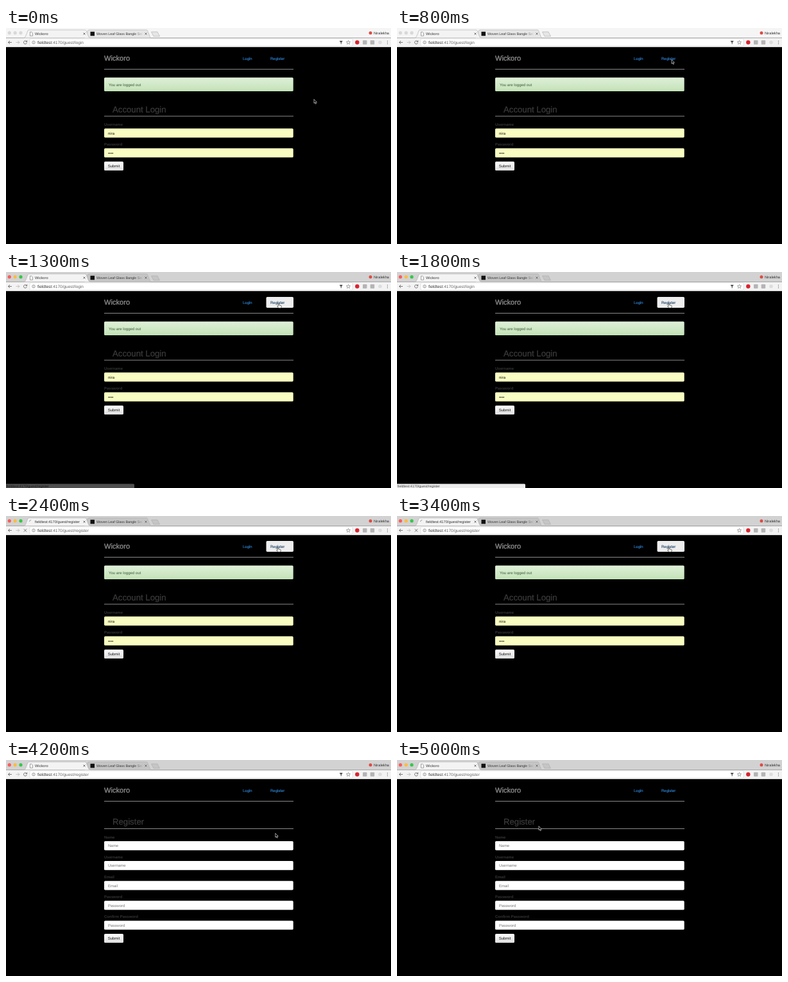
An HTML page for the animation above (5.1 s loop, 600 by 338 pixels).

```html
<!DOCTYPE html>
<html lang="en">
<head>
<meta charset="utf-8">
<title>Register walkthrough</title>
<style>
  html, body { margin: 0; height: 100%; overflow: hidden; background: #000; }
  svg { display: block; width: 100vw; height: 100vh; font: 6px "Liberation Sans", Arial, sans-serif; text-rendering: geometricPrecision; }
  .line { stroke: #8c8c8c; stroke-width: 1; }
  .brand { font-size: 11.1px; fill: #858585; stroke: #858585; stroke-width: .4; }
  .title { font-size: 13.2px; fill: #393939; stroke: #393939; stroke-width: .3; }
  .label { font-weight: bold; fill: #343434; }
  .link { fill: #2f86d8; stroke: #2f86d8; stroke-width: .12; }
  .small { font-size: 5.7px; fill: #333; }
  .icon { fill: none; stroke: #666; stroke-width: .9; }
</style>
</head>
<body>
<svg viewBox="0 0 600 338">
  <defs>
    <linearGradient id="green" x2="0" y2="1"><stop stop-color="#dff0d8"/><stop offset="1" stop-color="#c3e2b7"/></linearGradient>
    <linearGradient id="button" x2="0" y2="1"><stop stop-color="#fff"/><stop offset="1" stop-color="#dedede"/></linearGradient>
    <linearGradient id="fade" gradientUnits="userSpaceOnUse" x1="200" x2="214"><stop stop-color="#333"/><stop offset="1" stop-color="#333" stop-opacity="0"/></linearGradient>
  </defs>
  <rect width="600" height="338"/>

  <!-- browser frame -->
  <rect id="strip" width="600" height="15.5"/>
  <g id="lights"><circle cx="5.3" cy="7.7" r="2.6"/><circle cx="14.2" cy="7.7" r="2.6"/><circle cx="23" cy="7.7" r="2.6"/></g>
  <g stroke="#aaa" stroke-width=".6">
    <path id="backTab" d="M123 15.5L127.500 4Q128 3 129 3H219Q220 3 220.500 4L225 15.500"/>
    <path id="plusTab" d="M226.500 6H236L239.500 13H230Z"/>
    <path d="M0 15.500H28Q30 15 31 12L34 4Q34.500 3 36 3H123Q124.500 3 125 4L128 12Q129 15 131 15.500H600" fill="#f3f3f3"/>
  </g>
  <rect y="15.8" width="600" height="14.2" fill="#f3f3f3"/>
  <rect y="29.5" width="600" height=".5" fill="#b0b0b0"/>
  <rect x="37" y="17" width="503" height="11.300" rx="1.200" fill="#fff" stroke="#ccc" stroke-width=".5"/>
  <rect x="131.500" y="5.800" width="6.500" height="6.500" fill="#111"/>
  <text x="141" y="11" font-size="5.4" fill="url(#fade)">Woven Leaf Glass Bangle Set</text>
  <path class="icon" d="M120.500 7.500l3 3m0-3l-3 3M216.500 7.500l3 3m0-3l-3 3"/>
  <path class="icon" d="M9 22.500H3.500m2.500-2.500l-2.500 2.500 2.500 2.500"/>
  <path class="icon" d="M15.500 22.500H21m-2.500-2.500l2.500 2.500-2.500 2.500" style="stroke:#bbb"/>
  <g class="icon"><circle cx="43" cy="22.500" r="2.300" stroke-width=".6"/><path d="M43 22v1.700M43 20.900v.6" stroke-width=".6"/></g>
  <path class="icon" style="stroke-width:.6" d="M533.500 19.500l.9 2 2.200.2-1.700 1.500.5 2.200-1.900-1.200-1.900 1.200.5-2.200-1.700-1.500 2.200-.2z"/>
  <circle cx="547.300" cy="22.500" r="3.200" fill="#d8232f"/>
  <g fill="#b4b4b4"><rect x="556" y="19.300" width="6.500" height="6.500" rx="1"/><rect x="567.700" y="19.300" width="6.500" height="6.500" rx="1"/></g>
  <circle cx="583" cy="22.500" r="2.800" fill="#ddd"/>
  <g fill="#666"><circle cx="594.500" cy="20.300" r=".6"/><circle cx="594.500" cy="22.500" r=".6"/><circle cx="594.500" cy="24.700" r=".6"/></g>
  <circle cx="568" cy="7.700" r="2.500" fill="#df4b45"/>
  <text class="small" x="573" y="9.700">Niralekha</text>
  <text class="small" id="tabTitle" x="45" y="11"></text>
  <text x="49" y="24.700" font-size="6.5" fill="#333">fieldtest<tspan id="path" fill="#666"></tspan></text>
  <g id="idle">
    <path class="icon" d="M37.500 6.300h2.500l1.500 1.500v4.500h-4z" style="stroke-width:.6;fill:#fff"/>
    <path class="icon" d="M32.200 21.300A2.500 2.500 0 1 0 32.400 23.300M32.700 19.500v2.200h-2.200"/>
    <path d="M519.800 20h4.800l-1.200 2.500h-2.400zM521.700 22h1.100v3.300h-1.100z" fill="#555"/>
  </g>
  <g id="busy">
    <path id="spinner" class="icon" d="M36.500 9A2.700 2.700 0 0 1 39.200 6.300" style="stroke:#999"/>
    <path class="icon" d="M27.800 20.300l4.400 4.400m0-4.400l-4.400 4.400"/>
  </g>

  <!-- page header -->
  <text class="brand" x="153" y="51.300">Wickoro</text>
  <text class="link" x="369" y="49.600">Login</text>
  <rect id="hover" x="405.500" y="39" width="42.500" height="17" rx="1.800" fill="#eee"/>
  <text id="register" class="link" x="412" y="49.600">Register</text>
  <path class="line" d="M153 64.500H448"/>

  <g id="loginPage">
    <rect x="153" y="77.500" width="294.700" height="21.500" rx="1.600" fill="url(#green)"/>
    <text x="160" y="90.500" fill="#3b5a3c">You are logged out</text>
  </g>
  <g id="registerPage"></g>

  <g id="status">
    <path d="M0 331.500H198.500Q200 331.500 200 333V338H0Z" fill="#ececec"/>
    <text x=".7" y="337" font-size="5.4" fill="#444">fieldtest:4170/guest/register</text>
  </g>

  <g id="cursor" stroke-width=".6" stroke-linejoin="round">
    <path id="arrow" stroke="#fff" d="M0 0V6.200L1.400 5 2.400 7.300 3.500 6.800 2.500 4.600H4.400Z"/>
    <path id="hand" fill="#fff" stroke="#111" d="M-.8 .6Q0-.3 .7 .6V3L3.600 3.600Q4.400 4 4.200 5L3.600 7.500H-.2L-2.300 4.800Q-2.200 3.800-.8 4.600Z"/>
  </g>
</svg>
<script>
const $ = id => document.getElementById(id);
const show = (id, on) => $(id).style.display = on ? "" : "none";

const heading = (name, line) =>
  `<text class="title" x="166" y="${line - 6.2}">${name}</text><path class="line" d="M153 ${line}H448"/>`;
const field = (label, y, text, fill, ink) =>
  `<text class="label" x="153" y="${y - 4.2}">${label}</text>
   <rect x="153" y="${y}" width="294.700" height="14.200" rx="1.600" fill="${fill}"/>
   <text x="159" y="${y + 9.3}" fill="${ink}">${text}</text>`;
const submit = y =>
  `<rect x="153" y="${y}" width="30" height="14" rx="1.600" fill="url(#button)"/>
   <text x="168" y="${y + 9.1}" text-anchor="middle" fill="#111">Submit</text>`;

$("loginPage").innerHTML += heading("Account Login", 138)
  + field("Username", 157.2, "nira", "#fafdc2", "#111")
  + field("Password", 188.3, "••••", "#fafdc2", "#111")
  + submit(209);
$("registerPage").innerHTML = heading("Register", 107.5)
  + ["Name", "Username", "Email", "Password", "Confirm Password"].map((label, i) =>
      field(label, 127 + 31.1 * i, label.replace("Confirm ", ""), "#fff", "#747474")).join("")
  + submit(272);

// cursor tip: time, x, y
const route = [
  [0, 480, 111.5], [100, 480, 111.5], [600, 428, 49.5], [1100, 428, 49.5], [1400, 424, 48.8],
  [4000, 424, 48.8], [4500, 412, 236], [5000, 221, 103.5], [5100, 221, 103.5]
];
function cursorAt(t) {
  const i = route.findIndex(p => p[0] > t);
  const [t0, x0, y0] = route[i - 1], [t1, x1, y1] = route[i];
  const u = (t - t0) / (t1 - t0), k = u * u * (3 - 2 * u);
  return [x0 + (x1 - x0) * k, y0 + (y1 - y0) * k];
}

function draw(t) {
  const active = t >= 900, loading = t >= 2100 && t < 3500, done = t >= 3500;
  const hovered = t >= 1300 && !done, hand = t >= 1300 && t < 4100;
  const target = ":4170/guest/register";

  $("strip").setAttribute("fill", active ? "#d2d2d2" : "#f5f5f5");
  $("backTab").setAttribute("fill", active ? "#c5c5c5" : "#e6e6e6");
  $("plusTab").setAttribute("fill", active ? "#c5c5c5" : "#e6e6e6");
  ["#fc5b57", "#fdbc40", "#34c84a"].forEach((color, i) =>
    $("lights").children[i].setAttribute("fill", active ? color : "#d8d8d8"));

  $("tabTitle").textContent = loading ? "fieldtest" + target : "Wickoro";
  $("path").textContent = loading || done ? target : ":4170/guest/login";
  show("idle", !loading);
  show("busy", loading);
  $("spinner").setAttribute("transform", `rotate(${-(t - 2400) * .36} 39.200 9)`);

  show("hover", hovered);
  $("register").style.fill = $("register").style.stroke = hovered ? "#23476b" : "";
  show("loginPage", !done);
  show("registerPage", done);
  show("status", t >= 1300 && t < 2200);
  $("status").style.opacity = Math.min(1, (t - 1200) / 300);

  show("arrow", !hand);
  show("hand", hand);
  $("cursor").setAttribute("transform", `translate(${cursorAt(t)})`);
}

function tick() {
  draw(Math.floor(performance.now() % 5100 / 100) * 100);
  requestAnimationFrame(tick);
}
tick();
</script>
</body>
</html>
```
